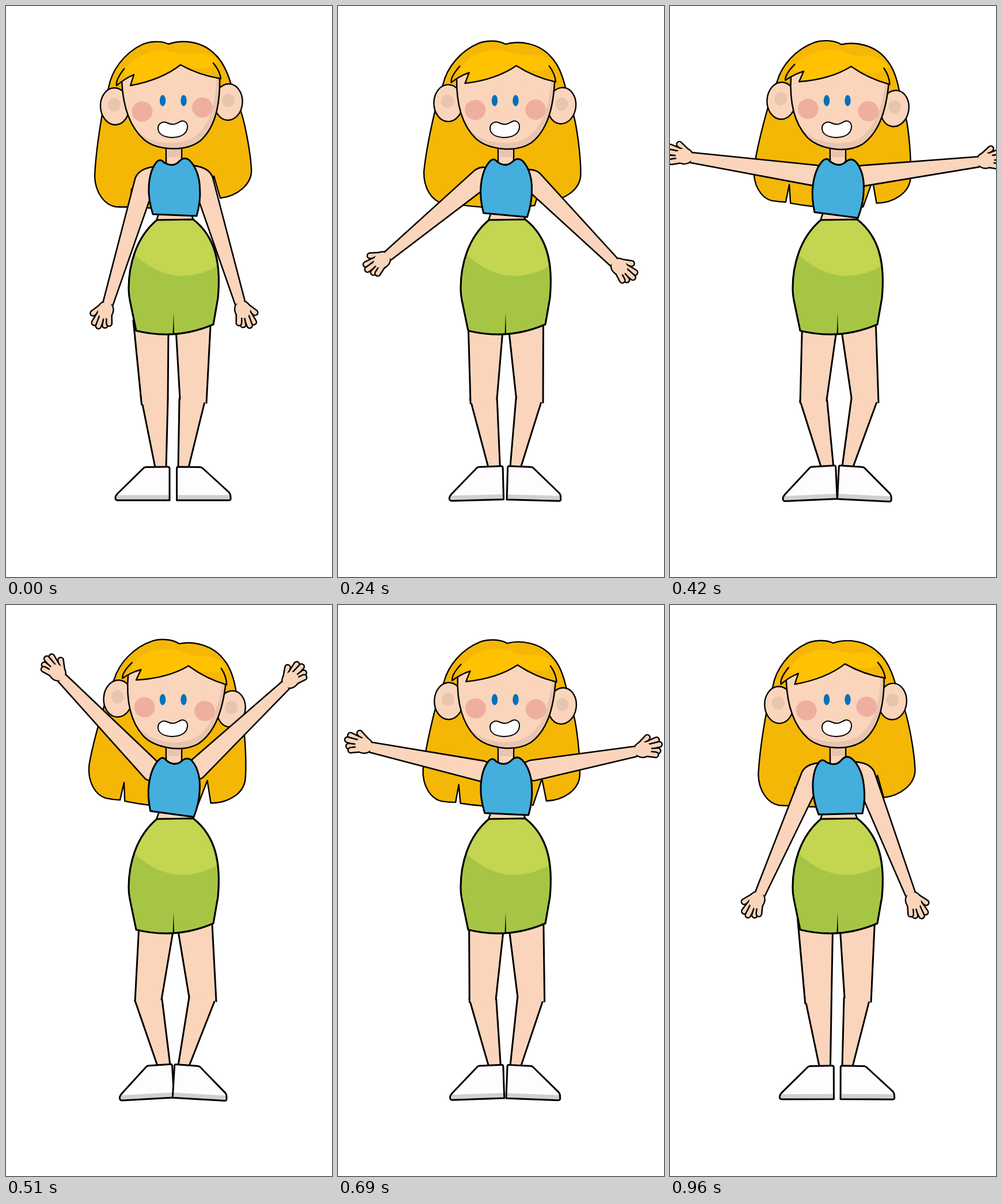
Recreate the animation shown at these times as an HTML page with a canvas. Size 566 by 990 pixels, loop 990 ms.

```html
<!DOCTYPE html>
<html lang="en">
<head>
<meta charset="utf-8">
<title>Waving girl</title>
<style>
html, body { margin: 0; width: 100%; height: 100%; overflow: hidden; background: #fff; }
canvas { display: block; }
</style>
</head>
<body>
<canvas id="stage" width="566" height="990"></canvas>
<script>
const ctx = document.getElementById('stage').getContext('2d');
const LOOP = 990, STEP = 30, PEAK = 510;
const INK = '#000', SKIN = '#fad5bb', SHADE = '#e8c5af', HAIR = '#f5b706', SHINE = '#ffc200';

// Pose times, then one value per pose
const TIMES = [0, 240, 360, 510, 690, 810, 960, 990];
const SHIRT_TILT = [0, .052, .078, .098, .006, -.033, -.066, -.073];

// Shoulder x, y and wrist x, y for each pose; the right arm is given mirrored
const leftArm = armTracks([
  [241.5, 304, 177.5, 514.5], [249, 298.5, 87.5, 432.5], [249, 297, 54.5, 370], [255, 289, 98, 127.5],
  [250, 288, 58, 247], [249, 301, 75, 410.5], [245.5, 297, 157, 499.5]
]);
const rightArm = armTracks([
  [241.5, 302, 177, 513.5], [245, 303, 105, 443], [246, 300, 66, 371.5], [254, 286.5, 98.5, 140],
  [246, 287, 67, 254], [246, 303, 90.5, 417.5], [245, 296, 166, 500]
]);
// Palm-to-tip lines along the arm axis, measured from the wrist
const FINGERS = [[10, 9, 25, 20], [20, 8, 40, 13], [20, 3, 43.5, 4.5], [20, -4, 39, -6], [18, -7, 34, -12]];

const shapes = {
  backHair: 'M282 66C268 59 247 62 236 67C205 82 183 112 178 142C168 170 156 250 154 295C155 325 172 345 190 348' +
    'Q203 349 215 348L218 317L223.5 349Q290 354 349.5 342L361 295L372 333C400 330 428 310 426 282' +
    'C424 250 415 205 408 183L392 140C385 115 375 95 363 84C340 60 305 58 282 66Z',
  face: 'M201 128C203 175 215 210 240 232C262 250 310 254 337 234C362 212 372 175 371 120L303 100Z',
  jaw: 'M201 130C203 175 215 210 240 232C262 250 310 254 337 234C362 212 372 175 371 122',
  bangs: 'M205 109Q190 128 192 138Q206 126 222 119L216 138Q270 128 303 102Q335 120 373 126Q371 112 360 99',
  bangsTop: 'M205 109Q230 70 282 70Q335 70 360 99Z',
  shine: 'M204 121C210 100 228 84 258 78C285 74 298 85 318 83C345 79 362 86 367 97C360 109 340 110 322 108' +
    'L303 102Q270 128 218 136L222 119Q212 120 204 121Z',
  neck: 'M278 245L278 280L305 280L305 245',
  shirt: 'M255 361C250 345 247 330 248 313C249 295 254 279 262 270Q268 264 274 271Q290 281 301 269' +
    'Q310 260 319 268C331 280 336 299 336.5 315C338 333 335 350 331 364Z',
  waist: 'M266 358L261 372L326 372L321 360',
  skirt: 'M262 371C225 402 213 450 213 490Q213 500 215 510L226 563Q295 580 360 552L368 506' +
    'C373 450 366 402 325 370Z',
  skirtLight: 'M262 371C240 390 229 410 224 432Q290 492 365 452C361 415 345 387 325 370Z',
  mouth: 'M264 212C264 203 273 199 281 203C291 208 297 203 303 200C310 197 316 203 315 211' +
    'C313 224 300 228 287 228C272 227 264 221 264 212Z',
  leftShoe: 'M243 799.5L281 799Q284 799 284 802L284 857L194 857Q189 857 190 851Q191 848 194 845L239 801Q241 799.5 243 799.5Z',
  rightShoe: 'M299 799L336 799.5Q339 799.5 341 801L387 843Q390 846 390 852Q391 857 387 857L296.5 857L296.5 802Q296.5 799 299 799Z'
};
for (const name in shapes) shapes[name] = new Path2D(shapes[name]);

function armTracks(poses) {
  const all = [...poses, poses[0]];
  return {
    x: all.map(p => p[0]),
    y: all.map(p => p[1]),
    angle: all.map(([sx, sy, wx, wy]) => Math.atan2(sx - wx, wy - sy)),
    length: all.map(([sx, sy, wx, wy]) => Math.hypot(sx - wx, sy - wy))
  };
}

// Smooth curve through the pose values
function spline(values, t) {
  const last = TIMES.length - 1;
  let i = 0;
  while (i < last - 1 && t >= TIMES[i + 1]) i++;
  const slope = k => {
    const a = Math.max(k - 1, 0), b = Math.min(k + 1, last);
    return (values[b] - values[a]) / (TIMES[b] - TIMES[a]);
  };
  const span = TIMES[i + 1] - TIMES[i], u = (t - TIMES[i]) / span, v = 1 - u;
  return v * v * (1 + 2 * u) * values[i] + u * u * (3 - 2 * u) * values[i + 1] +
    span * u * v * (v * slope(i) - u * slope(i + 1));
}

function paint(path, fill, width) {
  if (fill) { ctx.fillStyle = fill; ctx.fill(path); }
  if (width) { ctx.strokeStyle = INK; ctx.lineWidth = width; ctx.stroke(path); }
}

function oval(x, y, rx, ry, fill, width, turn = 0) {
  const path = new Path2D();
  path.ellipse(x, y, rx, ry, turn, 0, Math.PI * 2);
  paint(path, fill, width);
}

function within(draw) {
  ctx.save();
  draw();
  ctx.restore();
}

function turnAround(x, y, angle) {
  ctx.translate(x, y);
  ctx.rotate(angle);
  ctx.translate(-x, -y);
}

// Four corners: outer top, outer bottom, inner bottom, inner top; only the sides are inked
function limb(from, to, k) {
  const p = from.map((v, i) => v + (to[i] - v) * k);
  const fill = new Path2D(), sides = new Path2D();
  fill.moveTo(p[0], p[1]);
  for (let i = 2; i < 8; i += 2) fill.lineTo(p[i], p[i + 1]);
  sides.moveTo(p[0], p[1]);
  sides.lineTo(p[2], p[3]);
  sides.moveTo(p[4], p[5]);
  sides.lineTo(p[6], p[7]);
  paint(fill, SKIN);
  paint(sides, null, 3);
}

function shoe(path, dx, pivotX, angle) {
  within(() => {
    ctx.translate(dx, dx ? -Math.abs(dx) / 2 : 0);
    turnAround(pivotX, 828, angle);
    paint(path, '#fefcff');
    within(() => {
      ctx.clip(path);
      ctx.fillStyle = '#d0d0d0';
      ctx.fillRect(180, 848, 220, 12);
    });
    paint(path, null, 3);
  });
}

function legs(k) {
  limb([234, 676, 259, 800, 278, 800, 281, 682], [224, 686, 263, 799, 285, 798, 271, 684], k);
  limb([347, 678, 317, 800, 299, 800, 301, 681], [364, 682, 318, 799, 299, 798, 318, 680], k);
  limb([221, 545, 235.5, 691, 281, 682, 282, 560], [231.5, 545, 224, 687, 270, 684, 291, 560], k);
  limb([355.5, 545, 348, 688, 302, 681, 295, 560], [357.5, 545, 365, 687, 318, 680, 298, 560], k);
  shoe(shapes.leftShoe, 6 * k, 284, -.055 * k);
  shoe(shapes.rightShoe, -5.5 * k, 297, .06 * k);
}

function head(tilt) {
  within(() => {
    turnAround(283, 211, tilt);
    paint(shapes.backHair, HAIR, 2.4);
  });
  paint(shapes.neck, SKIN, 2.5);
  ctx.fillStyle = SHADE;
  ctx.fillRect(279.2, 246, 24.6, 16);
  within(() => {
    turnAround(283, 211, tilt);
    oval(189, 174, 25, 32, SKIN, 2.4, -.06);
    oval(386, 166.5, 24.5, 31.5, SKIN, 2.4, .06);
    oval(187.5, 171, 11, 11.5, SHADE);
    oval(386, 164, 11, 11.5, SHADE);
    within(() => {
      ctx.clip(shapes.face);
      paint(shapes.face, SHADE);
      ctx.translate(-6, -10);
      paint(shapes.face, SKIN);
      ctx.fillStyle = SKIN;
      ctx.fillRect(200, 100, 165, 50);
    });
    oval(236.5, 183, 18, 17.5, '#efafa0');
    oval(341, 176, 18, 17.5, '#efafa0');
    paint(shapes.jaw, null, 2.5);
    paint(shapes.bangsTop, HAIR);
    paint(shapes.bangs, HAIR);
    paint(shapes.shine, SHINE);
    paint(shapes.bangs, null, 2.4);
  });
  oval(272, 164, 5.2, 9.7, '#0071bc');
  oval(308.5, 164, 5.2, 9.7, '#0071bc');
  paint(shapes.mouth, '#fff', 2);
}

function hand() {
  oval(14, 1, 17, 15, INK);
  for (const [x1, y1, x2, y2] of FINGERS) {
    for (const [color, width] of [[INK, 12], [SKIN, 7]]) {
      ctx.strokeStyle = color;
      ctx.lineWidth = width;
      ctx.beginPath();
      ctx.moveTo(x1, y1);
      ctx.lineTo(x2, y2);
      ctx.stroke();
    }
  }
  oval(14, 1, 14.6, 12.6, SKIN);
}

function arm(track, t) {
  const length = spline(track.length, t);
  within(() => {
    ctx.translate(spline(track.x, t), spline(track.y, t));
    ctx.rotate(spline(track.angle, t) + Math.PI / 2);
    within(() => {
      ctx.translate(length, 0);
      hand();
    });
    const sleeve = new Path2D();
    sleeve.moveTo(length + 1, 9);
    sleeve.lineTo(0, 18);
    sleeve.quadraticCurveTo(-18, 17, -29, -8);
    sleeve.lineTo(0, -18);
    sleeve.lineTo(length + 1, -9);
    paint(sleeve, SKIN, 2.6);
  });
}

function drawScene(t) {
  const k = t < PEAK ? t / PEAK : (LOOP - t) / (LOOP - PEAK);
  ctx.fillStyle = '#fff';
  ctx.fillRect(0, 0, 566, 990);
  ctx.lineCap = ctx.lineJoin = 'round';

  legs(k);
  head(.129 * k);
  arm(leftArm, t);
  within(() => {
    ctx.translate(583, 0);
    ctx.scale(-1, 1);
    arm(rightArm, t);
  });
  paint(shapes.waist, SKIN, 2.6);
  within(() => {
    turnAround(292, 315, spline(SHIRT_TILT, t));
    paint(shapes.shirt, '#44aedd', 3);
  });
  paint(shapes.skirt, '#a7c545');
  paint(shapes.skirtLight, '#c3d551');
  paint(shapes.skirt, null, 3.2);
  paint(new Path2D('M291 532L289.5 569L292 569Z'), INK);
}

let start;
function tick(now) {
  start ??= now;
  drawScene(Math.floor(((now - start) % LOOP) / STEP) * STEP);
  requestAnimationFrame(tick);
}
drawScene(0);
requestAnimationFrame(tick);
</script>
</body>
</html>
```
